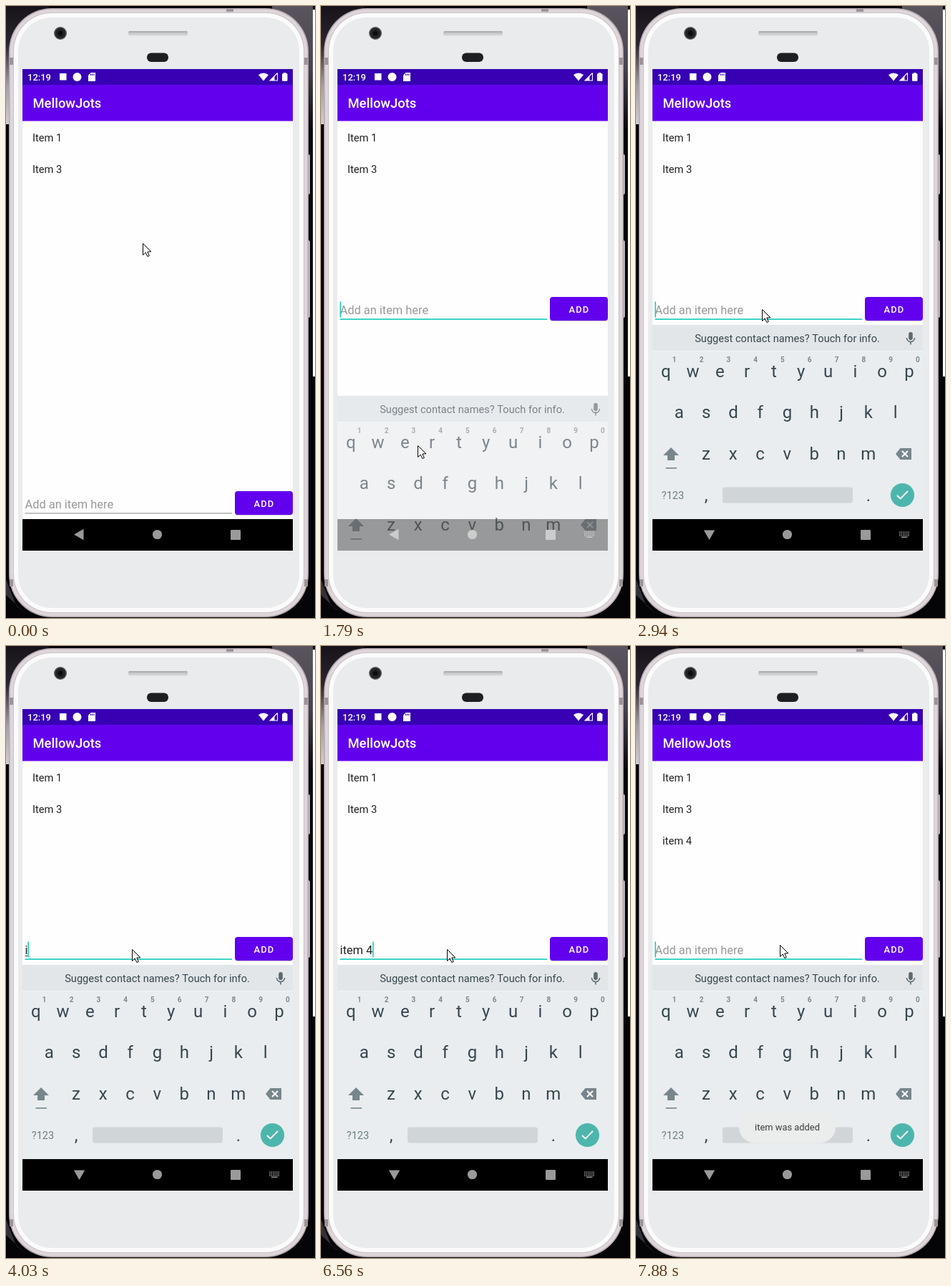
Write an HTML page with a canvas that moves like this. It is 432 by 854 pixels and loops after 8000 ms.

```html
<!DOCTYPE html>
<html lang="en">
<head>
<meta charset="utf-8">
<title>To-do list demo</title>
<style>
html, body { margin: 0; width: 432px; height: 854px; overflow: hidden; background: #000; }
canvas { display: block; }
</style>
</head>
<body>
<canvas id="stage" width="432" height="854"></canvas>
<script>
const c = document.getElementById('stage').getContext('2d');
const TEAL = '#2acfbf', PURPLE = '#6200ee', DEEP = '#3700b3', KEY = '#37474f', ICON = '#78868c';

// Moments of the story, in ms.
const LOOP = 8000, TICK = 132.5, FIRST_TICK = 560, BLINK = 520;
const FOCUS = 1520, SLIDE = 1790, OPEN = 1910, LEAVE = 6830, PRESS = 7490, ADDED = 7610;
const TYPED = 'item 4', KEY_TIMES = [4030, 4300, 5010, 5290, 6280, 6560];
const HINTS = {
  it: ["it's", 'it', 'is'],
  ite: ['item', 'ite', 'its'],
  item: ['items', 'item', "item's"]
};

// Pointer path: tick, x, y.
const PATH = [
  [-1, 191, 331], [2, 142, 665], [5, 135, 688], [8, 135, 688], [9, 135, 613],
  [10, 142, 562], [11, 152, 469], [15, 176, 423], [46, 176, 423], [48, 405, 471],
  [51, 366, 423], [53, 366, 423], [55, 201, 417]
];

const clamp = v => Math.min(1, Math.max(0, v));

function pointerAt(t) {
  const n = Math.floor((t - FIRST_TICK) / TICK);
  let [, x, y] = PATH[0];
  for (let i = 1; i < PATH.length; i++) {
    const [n0, x0, y0] = PATH[i - 1], [n1, x1, y1] = PATH[i];
    const p = clamp((n - n0) / (n1 - n0));
    if (p > 0) {
      x = x0 + (x1 - x0) * p;
      y = y0 + (y1 - y0) * p;
    }
  }
  return [Math.round(x), Math.round(y)];
}

function typedAt(t) {
  return t < ADDED ? TYPED.slice(0, KEY_TIMES.filter(k => k <= t).length) : '';
}

// The caret restarts its blink on focus and on each change, and rests on the way to the button.
function caretAt(t) {
  if (t < FOCUS || (t >= LEAVE && t < ADDED)) return false;
  const last = Math.max(...[FOCUS, OPEN - 10, ...KEY_TIMES, ADDED].filter(k => k <= t));
  return Math.floor((t - last) / BLINK) % 2 === 0;
}

function rect(x, y, w, h, color) {
  c.fillStyle = color;
  c.fillRect(x, y, w, h);
}
function round(x, y, w, h, r, color) {
  c.fillStyle = color;
  c.beginPath();
  c.roundRect(x, y, w, h, r);
  c.fill();
}
function disc(x, y, r, color) {
  c.fillStyle = color;
  c.beginPath();
  c.arc(x, y, r, 0, Math.PI * 2);
  c.fill();
}
function trace(pts) {
  c.beginPath();
  for (let i = 0; i < pts.length; i += 2) c.lineTo(pts[i], pts[i + 1]);
}
function poly(pts, color) {
  trace(pts);
  c.fillStyle = color;
  c.fill();
}
function line(pts, color, width) {
  trace(pts);
  c.strokeStyle = color;
  c.lineWidth = width;
  c.stroke();
}
function text(str, x, y, size, color, align = 'left', weight = 400) {
  c.font = `${weight} ${size}px Roboto, "Noto Sans", sans-serif`;
  c.textAlign = align;
  c.fillStyle = color;
  c.fillText(str, x, y);
}
function row(chars, x, y, size, color, weight) {
  [...chars].forEach((ch, i) => text(ch, x + i * 37.8, y, size, color, 'center', weight));
}
function vertical(y0, y1, ...colors) {
  const g = c.createLinearGradient(0, y0, 0, y1);
  colors.forEach((color, i) => g.addColorStop(i / (colors.length - 1), color));
  return g;
}
function group(paint) {
  c.save();
  paint();
  c.restore();
}

function drawBackdrop() {
  rect(0, 0, 432, 854, '#050406');
  rect(0, 0, 60, 165, vertical(0, 165, '#18131a', '#2b2530', '#a29da5', '#d0ccd1'));
  rect(372, 0, 57, 170, vertical(0, 170, '#5a545d', '#4a4550', '#0c0a0d'));
  rect(429, 5, 3, 512, '#fff');
  poly([0, 800, 14, 836, 30, 850, 0, 822], '#35313a');
}

function drawPhone() {
  round(420, 207, 5, 56, 2, '#bdb6ba');
  round(420, 327, 5, 108, 2, '#bdb6ba');
  const shell = (inset, color) =>
    round(4 + inset, 3 + inset, 419 - inset * 2, 850 - inset * 2, 60 - inset, color);
  shell(0, '#b3aaae');
  shell(1.5, '#ded6da');
  shell(6, '#c9c2c6');
  shell(7, '#fbfbfb');
  shell(13, '#e9ebec');
  for (const x of [5, 417]) for (const y of [72, 800]) rect(x, y, 5, 10, '#9c9498');
  rect(308, 4, 10, 4, '#9c9498');

  disc(76, 38, 9, '#55585b');
  disc(76, 38, 7.5, '#222527');
  disc(76, 38, 3.5, '#0b0d10');
  round(171, 35, 83, 6.5, 2, vertical(35, 42, '#a4a5a6', '#cbcccd', '#dcddde'));
  round(197, 65.5, 30, 12.5, 6, '#1d1f22');
}

function drawBars() {
  rect(23, 88, 378, 22, DEEP);
  rect(23, 110, 378, 50.5, PURPLE);
  text('12:19', 30, 104, 13, '#fff', 'left', 500);
  rect(75, 94, 9.5, 9.5, '#fff');
  disc(99.5, 99, 6, '#fff');
  poly([118.5, 93, 125, 93, 125, 105, 115, 105, 115, 96.5], '#fff');
  for (let i = 0; i < 3; i++) rect(118 + i * 2.2, 94.5, 1.1, 2.5, DEEP);

  c.beginPath();
  c.moveTo(360, 104.5);
  c.arc(360, 104.5, 11, -Math.PI * 0.72, -Math.PI * 0.28);
  c.fillStyle = '#fff';
  c.fill();
  line([379.5, 93.5, 379.5, 104, 369, 104, 379.5, 93.5], '#fff', 1.1);
  poly([375.5, 97.5, 375.5, 104, 369, 104], '#fff');
  round(386, 94.3, 7.5, 10.5, 1, '#fff');
  rect(388, 93, 3.5, 2, '#fff');

  text('MellowJots', 37.5, 142, 18.4, '#fff', 'left', 500);
}

function drawList(t) {
  const items = ['Item 1', 'Item 3'];
  if (t >= ADDED) items.push(TYPED);
  items.forEach((s, i) => text(s, 37, 189 + i * 44, 14.7, '#222'));
}

function drawForm(t) {
  const value = typedAt(t), focus = t >= FOCUS;
  text(value || 'Add an item here', 26.5, 701, 16.4, value ? '#222' : '#989898');
  const width = c.measureText(value).width;
  if (!value.includes(' ')) rect(26.5, 703, width, 1, '#333');
  if (caretAt(t)) rect(26.3 + width, 683.5, 1.7, 22, TEAL);
  rect(26.5, 707.2, 289.5, focus ? 1.8 : 1.3, focus ? TEAL : '#a2a2a2');

  round(320, 678, 81, 33, 4, 'rgba(0,0,0,.18)');
  round(320, 677, 81, 33, 4, PURPLE);
  if (t >= PRESS && t < PRESS + 240) round(320, 677, 81, 33, 4, 'rgba(255,255,255,.2)');
  c.letterSpacing = '1.15px';
  text('ADD', 346.5, 699, 12.9, '#fff', 'left', 500);
  c.letterSpacing = '0px';
}

function drawStrip(words) {
  rect(23, 445, 378, 36, '#e2e6e9');
  rect(23, 481, 378, 1, '#f3f5f6');
  if (words) {
    words.forEach((w, i) => {
      const x = 105 + i * 106.5, main = i === 1;
      text(w, x, 470, 16.2, main ? '#46555c' : ICON, 'center', main ? 700 : 400);
      disc(206.5 + i * 5, 478.5, 1.3, KEY);
    });
    for (const x of [155, 267]) rect(x, 452, 1, 23, '#cfd5d8');
  } else {
    text('Suggest contact names? Touch for info.', 211.5, 469, 14.6, KEY, 'center');
  }
  const mic = '#5c6a70';
  round(381.2, 455, 5.6, 11, 2.8, mic);
  c.beginPath();
  c.arc(384, 463, 5.6, 0, Math.PI);
  c.strokeStyle = mic;
  c.lineWidth = 1.5;
  c.stroke();
  rect(383.2, 468, 1.6, 4.5, mic);
}

function drawKeyboard(words) {
  rect(23, 445, 378, 271, '#e9edf0');
  drawStrip(words);
  row('1234567890', 53.7, 497, 10, '#7d898e', 700);
  row('qwertyuiop', 41.7, 518, 24, KEY);
  row('asdfghjkl', 60.3, 575, 24, KEY);
  row('zxcvbnm', 98, 633, 24, KEY);

  poly([49, 616, 60, 627, 54, 627, 54, 634, 44, 634, 44, 627, 38, 627], ICON);
  rect(41.5, 644, 15.5, 1.6, ICON);
  poly([369.5, 617, 385, 617, 385, 633, 369.5, 633, 363, 625], ICON);
  for (const d of [-4, 4]) line([376 - d, 621, 376 + d, 629], '#fff', 1.9);

  text('?123', 51.5, 688, 14.6, '#6e7c82', 'center');
  text(',', 98, 691, 24, KEY, 'center');
  round(121, 671.5, 182, 22, 3, '#d0d5d8');
  text('.', 325, 691, 24, KEY, 'center');
  disc(372.5, 682.5, 16.6, '#4db6ac');
  line([365, 683, 369.7, 687.5, 380, 677], '#fff', 1.9);
}

function drawNav(t) {
  const sliding = t >= SLIDE && t < OPEN;
  const color = sliding ? '#cbcccc' : '#999';
  rect(23, 716, 378, 44, sliding ? 'rgba(0,0,0,.37)' : '#000');
  group(() => {
    // Half a turn while the keyboard opens, then pointing down.
    c.translate(102.5, 737.5);
    c.rotate(-Math.PI / 4 * (t < OPEN ? 0 : t < OPEN + 120 ? 1 : 2));
    poly([-7.5, 0, 6, -7.7, 6, 7.7], color);
  });
  disc(211.5, 737.5, 6.6, color);
  round(314, 731, 14, 14, 1, color);
  if (t >= FOCUS + 120) {
    for (let i = 0; i < 18; i++)
      rect(368 + i % 6 * 2.5, 733.5 + Math.floor(i / 6) * 2.4, 1.5, 1.4, color);
    rect(371, 740.5, 8.5, 1.4, color);
  }
}

function drawToast(t) {
  const fade = clamp((t - ADDED) / 240);
  if (t < ADDED + 120) return;
  group(() => {
    c.globalAlpha = fade;
    round(144, 649, 135, 44.5, 22, '#ebecec');
    text('item was added', 211.5, 676, 12.9, '#3c3c3c', 'center');
  });
}

function drawPointer([x, y]) {
  group(() => {
    c.translate(x + 0.5, y + 0.5);
    const arrow = [0, 0, 0, 16, 3.7, 12.5, 6.3, 18, 8.8, 17, 6.3, 11.5, 11.3, 11.3, 0, 0];
    poly(arrow, '#fff');
    line(arrow, '#000', 1);
  });
}

function draw(t) {
  drawBackdrop();
  drawPhone();
  group(() => {
    c.beginPath();
    c.rect(23, 88, 378, 672);
    c.clip();
    rect(23, 88, 378, 672, '#fefefe');
    drawBars();
    drawList(t);
    group(() => {
      if (t >= SLIDE) c.translate(0, -271);
      drawForm(t);
    });
    if (t >= SLIDE) group(() => {
      if (t < OPEN) {
        c.translate(0, 99);
        c.globalAlpha = 0.63;
      }
      drawKeyboard(HINTS[typedAt(t).trim()]);
    });
    drawNav(t);
    drawToast(t);
  });
  drawPointer(pointerAt(t));
}

const began = performance.now();
function tick() {
  draw((performance.now() - began) % LOOP);
  requestAnimationFrame(tick);
}
tick();
</script>
</body>
</html>
```
